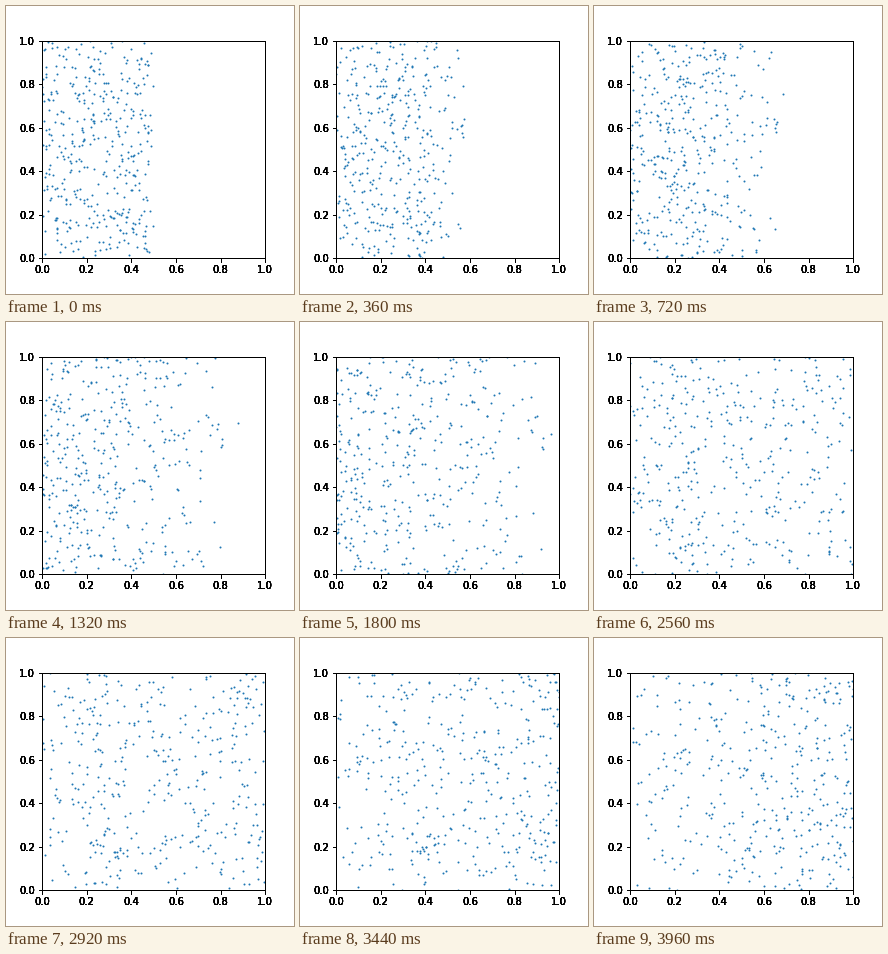
Animation of 288 by 288 pixels, one loop 4 s. Source, as a matplotlib script:

```python
import numpy as np
import matplotlib.pyplot as plt
from matplotlib.animation import FuncAnimation

COUNT = 400
FRAMES = 100
INTERVAL = 40
SPEED = 0.01
BOX = [0.125, 0.125, 0.775, 0.755]
LABEL_LAYERS = 6

plt.rcParams.update({"font.family": "DejaVu Sans", "font.size": 10})

rng = np.random.default_rng(7)
start = rng.random((COUNT, 2)) * [0.5, 1.0]
angle = rng.uniform(0, 2 * np.pi, COUNT)
velocity = SPEED * np.column_stack([np.cos(angle), np.sin(angle)])

# one particle outruns the rest of the gas
start[0] = 0.451, 0.826
velocity[0] = 0.013, -0.004


def bounce(p):
    """Fold free flight back into the unit box."""
    return 1 - np.abs(p % 2 - 1)


def add_box(fig, name):
    ax = fig.add_axes(BOX, label=name)
    ax.set(xlim=(0, 1), ylim=(0, 1))
    ax.patch.set_visible(False)
    return ax


fig = plt.figure(figsize=(4, 4), dpi=72, facecolor="white")
ax = add_box(fig, "gas")
dots, = ax.plot([], [], "o", color="C0", markersize=1, markeredgewidth=1)

# stacked axes give the labels and frame their heavy, dark edges
for i in range(LABEL_LAYERS):
    add_box(fig, f"layer {i}")


def draw(frame):
    x, y = bounce(start + frame * velocity).T
    dots.set_data(x, y)
    return dots,


anim = FuncAnimation(fig, draw, frames=FRAMES, interval=INTERVAL,
                     init_func=lambda: draw(0), repeat=True, repeat_delay=0)
plt.show()
```
